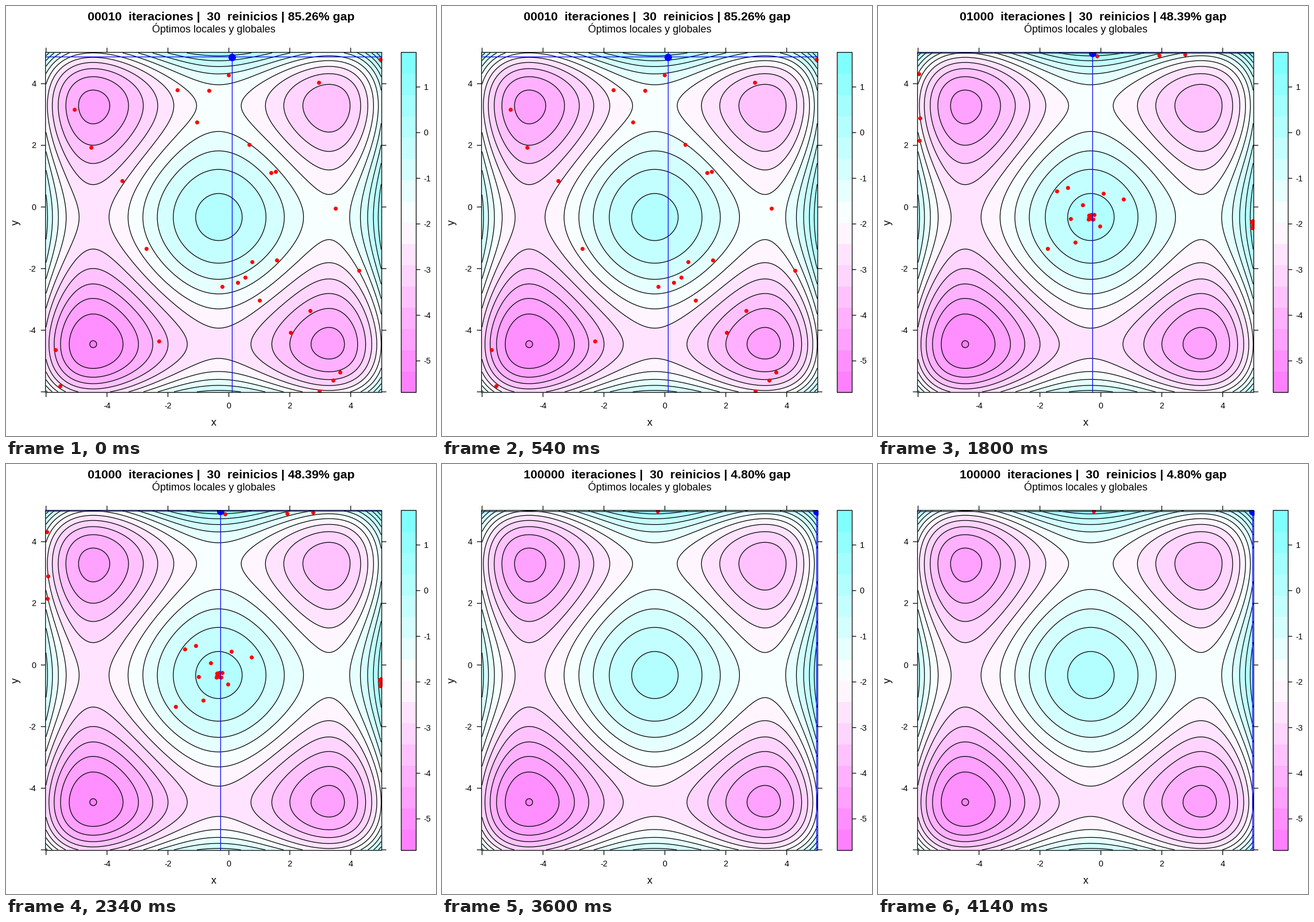
These frames come from a looping animation (748x748 px, 4500 ms). A matplotlib script:

```python
import numpy as np
import matplotlib.pyplot as plt
from matplotlib.animation import FuncAnimation
from matplotlib.patches import Rectangle

plt.rcParams["font.family"] = "Liberation Sans"
plt.rcParams["path.snap"] = False

SIZE, DPI = 748, 64
PT = 72 / DPI                      # points per pixel
STROKE = 1.25 * PT
LEFT, RIGHT, TOP, BOTTOM = 68.7, 653.6, 80.6, 672.2
KEY_LEFT, KEY_RIGHT = 687.5, 713.5
LOW, HIGH, PAD = -6, 5, 0.0184
SPAN = HIGH - LOW + 2 * PAD
BANDS = 16

# Iterations, gap, best point, then clusters of restarts as
# (count, centre, half extent): they gather on the maxima as time goes on.
EVERYWHERE = (-0.5, -0.5), (5.5, 5.5)
STEPS = [
    ("00010", "85.26", (0.11, 4.87), [(29, *EVERYWHERE)]),
    ("00100", "50.33", (4.99, -0.69), [
        (16, (-0.5, 0.2), (2, 2)),
        (8, (1.1, -5.85), (0.9, 0.15)),
        (2, (-5.95, 0.5), (0.05, 0.8)),
        (3, *EVERYWHERE)]),
    ("01000", "48.39", (-0.27, 4.99), [
        (9, (-0.33, -0.3), (0.12, 0.12)),
        (9, (-0.5, -0.4), (1.6, 1.2)),
        (5, (4.95, -0.55), (0.05, 0.4)),
        (3, (1.8, 4.95), (2.4, 0.05)),
        (3, (-5.97, -0.6), (0.03, 5.2))]),
    ("10000", "1.78", (4.995, 4.99), [
        (9, (-0.3, 4.97), (0.5, 0.03)),
        (9, (4.97, -0.6), (0.04, 0.7)),
        (2, (-0.55, -0.43), (0.15, 0.1))]),
    ("100000", "4.80", (4.98, 4.98), [
        (1, (-0.23, 4.99), (0, 0)),
        (28, (4.95, 4.96), (0.03, 0.02))]),
]


def px(x):
    return LEFT + (x - LOW + PAD) / SPAN * (RIGHT - LEFT)


def py(y):
    return BOTTOM - (y - LOW + PAD) / SPAN * (BOTTOM - TOP)


def surface(lo, hi, n=500):
    t = np.linspace(lo, hi, n)
    g = 0.01 * ((t + 0.5) ** 4 - 30 * t ** 2 - 20 * t)
    return px(t), py(t), g[None, :] + g[:, None]


def band_color(i):
    """Magenta through white to cyan, in a hundred shades."""
    j = i * 99 // (BANDS - 1)
    if j < 50:
        return 1, 0.5 + j / 100, 1
    return 1.49 - j / 100, 1, 1


def restarts(step):
    rng = np.random.default_rng(step)
    return np.vstack([
        np.add(centre, rng.uniform(-1, 1, (count, 2)) * extent)
        for count, centre, extent in STEPS[step][3]])


fig = plt.figure(figsize=(SIZE / DPI, SIZE / DPI), dpi=DPI, facecolor="white")
ax = fig.add_axes([0, 0, 1, 1])
ax.axis("off")


def label(x, y, s, size, **kw):
    kw = {"ha": "center", "va": "baseline", **kw}
    return ax.text(x, y, s, fontsize=size * PT, color="black", **kw)


def line(xs, ys, color="black", **kw):
    return ax.plot(xs, ys, color=color, lw=STROKE,
                   solid_capstyle="butt", **kw)[0]


def dot(color, size, **kw):
    return ax.plot([], [], "o", color=color, ms=size * PT, mew=0, **kw)[0]


def box(x0, x1):
    return ax.add_patch(Rectangle((x0, TOP), x1 - x0, BOTTOM - TOP, fill=False,
                                  ec="black", lw=STROKE, zorder=6))


# Equal bands over the slightly extended range
z = surface(LOW, HIGH)[2]
extra = 0.07 * (z.max() - z.min())
levels = np.linspace(z.min() - extra, z.max() + extra, BANDS + 1)
colors = [band_color(i) for i in range(BANDS)]

ax.contourf(*surface(LOW - PAD, HIGH + PAD), levels=levels, colors=colors,
            zorder=1)
ax.contour(*surface(LOW, HIGH), levels=levels, colors="black",
           linewidths=STROKE, linestyles="solid", zorder=2)
panel = box(LEFT, RIGHT)

# Axes
for v in range(-6, 5, 2):
    x, y = px(v), py(v)
    line([x, x], [TOP, TOP - 8])
    line([x, x], [BOTTOM, BOTTOM + 8])
    line([LEFT, LEFT - 8], [y, y])
    line([RIGHT, RIGHT + 8], [y, y])
    if v > LOW:
        label(x, 700, str(v), 14.4)
        label(52.5, y + 5, str(v), 14.4, ha="right")
label(361.2, 730, "x", 18)
label(26, 376, "y", 18, rotation=90, va="center", ha="right")

# Colour key
step_height = (BOTTOM - TOP) / BANDS
for i, c in enumerate(colors):
    ax.add_patch(Rectangle((KEY_LEFT, BOTTOM - (i + 1) * step_height),
                           KEY_RIGHT - KEY_LEFT, step_height, fc=c, lw=0,
                           antialiased=False))
box(KEY_LEFT, KEY_RIGHT)
for v in range(-5, 2):
    y = np.interp(v, levels[[0, -1]], [BOTTOM, TOP])
    line([KEY_RIGHT, KEY_RIGHT + 7], [y, y])
    label(726.5, y + 5, str(v), 14.4, ha="left")

title = label(374.5, 25, "", 21.25, weight="bold")
label(361.2, 46.3, "Óptimos locales y globales", 18)

# Moving parts
dots = dot("red", 7, zorder=3)
across = line([], [], "blue", zorder=4)
down = line([], [], "blue", zorder=4)
best = dot("blue", 13, zorder=5)
for part in (dots, across, down, best):
    part.set_clip_path(panel)

ax.set_xlim(0, SIZE)
ax.set_ylim(SIZE, 0)


def draw(i):
    count, gap, (x, y), _ = STEPS[i]
    title.set_text(f"{count}  iteraciones |  30  reinicios | {gap}% gap")
    xs, ys = restarts(i).T
    dots.set_data(px(xs), py(ys))
    across.set_data([LEFT, RIGHT], [py(y)] * 2)
    down.set_data([px(x)] * 2, [TOP, BOTTOM])
    best.set_data([px(x)], [py(y)])
    return title, dots, across, down, best


anim = FuncAnimation(fig, draw, frames=len(STEPS), interval=900, repeat=True,
                     repeat_delay=0)
plt.show()
```
